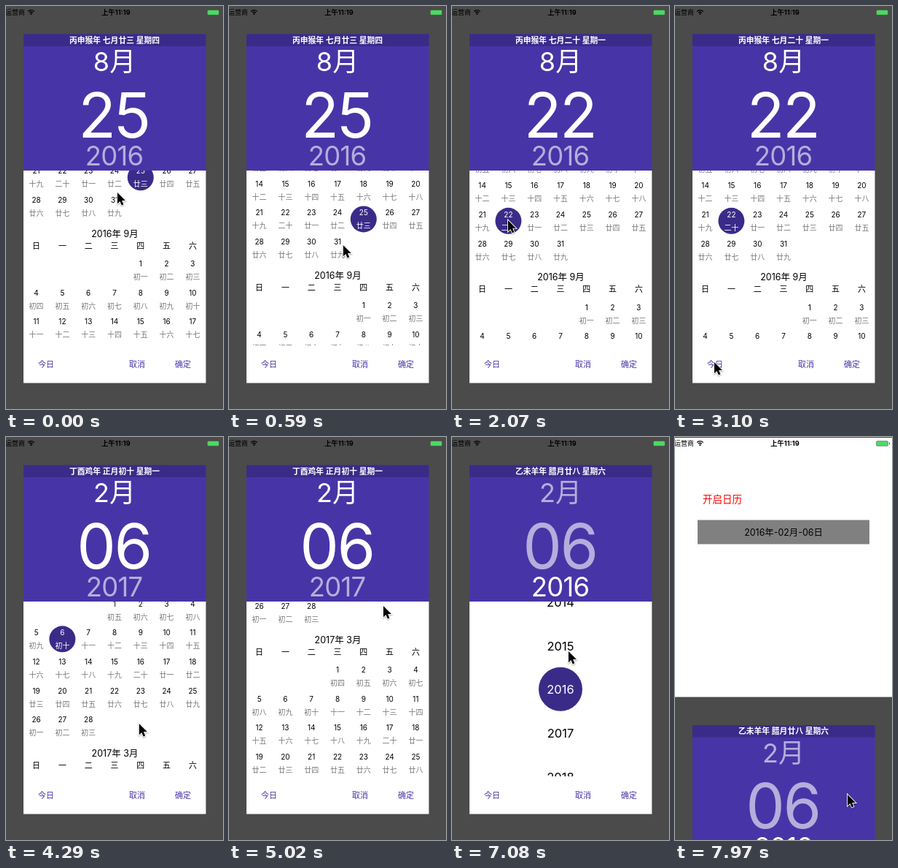
These frames come from a looping animation (298 px wide and 551 px high, 8000 ms). An HTML page with a canvas:

```html
<!DOCTYPE html>
<html lang="zh-CN">
<head>
<meta charset="utf-8">
<title>日历</title>
<style>
html, body { margin: 0; width: 100%; height: 100%; overflow: hidden; background: #fff; }
canvas { display: block; width: 298px; height: 551px; }
</style>
</head>
<body>
<canvas width="298" height="551"></canvas>
<script>
const ctx = document.querySelector('canvas').getContext('2d');
const FONT = 'Inter, "Noto Sans CJK SC", "Noto Sans CJK", sans-serif';
const LOOP = 8000, TICK = 147.6, LAST_TICK = 54;
const PURPLE = '#4735a7', DARK = '#3b2b89', SHADE = '#4b4b4b', DIM = '#b5aedc';
const MID = 149, COLUMN = 35.8, ROW = 39.7, MONTH_HEAD = 47.3, YEAR_ROW = ROW * 1.5;
const LEFT = 24, WIDTH = 250.5, TOP = 38.5, LIST_TOP = 225, LIST_BOTTOM = 464, BOTTOM = 515.5;
const TODAY_TICK = 23, YEARS_TICK = 39;
const DIGITS = '一二三四五六七八九十';
const WEEK = '日一二三四五六';

const STAGES = [
  { from: 0, year: 2016, month: 8, day: 25, lunar: '丙申猴年 七月廿三 星期四' },
  { from: 9, year: 2016, month: 8, day: 24, lunar: '丙申猴年 七月廿二 星期三' },
  { from: 14, year: 2016, month: 8, day: 22, lunar: '丙申猴年 七月二十 星期一' },
  { from: TODAY_TICK, year: 2017, month: 2, day: 6, lunar: '丁酉鸡年 正月初十 星期一' },
  { from: 46, year: 2016, month: 2, day: 6, lunar: '乙未羊年 腊月廿八 星期六' }
];

const columnX = c => 41.6 + c * COLUMN;
const dayNumber = (y, m, d) => Date.UTC(y, m - 1, d) / 864e5;
const progress = (k, from, to) => Math.min(1, Math.max(0, (k - from) / (to - from)));
const easeOut = (k, from, to) => 1 - (1 - progress(k, from, to)) ** 2;

// Lunar months alternate between 30 and 29 days from a new moon near each year shown.
function lunarDay(y, m, d) {
  const synodic = 29.5306;
  const newMoon = y === 2016 ? dayNumber(2016, 7, 4) : dayNumber(2016, 12, 29);
  const age = dayNumber(y, m, d) - newMoon;
  const n = age - Math.floor(0.5 + synodic * Math.floor((age + 0.5) / synodic)) + 1;
  if (n === 20) return '二十';
  if (n === 30) return '三十';
  return '初十廿'[Math.floor((n - (n === 10)) / 10)] + DIGITS[(n - 1) % 10];
}

function text(s, x, centerY, size, color, { weight = 400, align = 'center', spacing = 0 } = {}) {
  ctx.font = `${weight} ${size}px ${FONT}`;
  ctx.letterSpacing = spacing + 'px';
  ctx.textAlign = align;
  ctx.fillStyle = color;
  ctx.fillText(s, x, centerY + size * 0.37);
}

function rect(x, y, w, h, color) {
  ctx.fillStyle = color;
  ctx.fillRect(x, y, w, h);
}

function disc(x, y, r, color) {
  ctx.fillStyle = color;
  ctx.beginPath();
  ctx.arc(x, y, r, 0, 7);
  ctx.fill();
}

// Draws one month and returns the title position of the next.
function drawMonth(y, m, top, stage) {
  const first = new Date(Date.UTC(y, m - 1, 1)).getUTCDay();
  const days = dayNumber(y, m + 1, 1) - dayNumber(y, m, 1);
  text(`${y}年 ${m}月`, MID + 0.5, top + 0.3, 12.5, '#000');
  [...WEEK].forEach((w, c) => text(w, columnX(c), top + 17, 11, '#000'));
  for (let d = 1; d <= days; d++) {
    const slot = first + d - 1;
    const x = columnX(slot % 7), rowY = top + 41.5 + Math.floor(slot / 7) * ROW;
    const picked = y === stage.year && m === stage.month && d === stage.day;
    if (picked) disc(x, rowY + 8.7, 18, DARK);
    text(d, x, rowY, 10, picked ? '#fff' : '#000');
    text(lunarDay(y, m, d), x, rowY + 18, 10, picked ? '#fff' : '#777');
  }
  return top + MONTH_HEAD + Math.ceil((first + days) / 7) * ROW;
}

function drawCalendar(k, stage) {
  if (k < TODAY_TICK) {
    const august = 65 + ROW * 1.5 * easeOut(k, 0, 5);
    drawMonth(2016, 9, drawMonth(2016, 8, august, stage), stage);
  } else {
    const january = 9 - 224 * easeOut(k, 28, 34);
    const february = drawMonth(2017, 1, january, stage);
    drawMonth(2017, 3, drawMonth(2017, 2, february, stage), stage);
  }
}

function drawYears(k, stage) {
  const middle = 2017 - easeOut(k, 45, 48);
  for (let y = 2013; y <= 2020; y++) {
    const rowY = 344.8 + (y - middle) * YEAR_ROW, picked = y === stage.year;
    if (picked) disc(MID, rowY, 30, DARK);
    text(y, MID, rowY + 0.5, 16.5, picked ? '#fff' : '#000');
  }
}

function drawPage() {
  rect(0, 0, 298, 551, '#fff');
  text('开启日历', 38, 85, 13.5, '#f00', { align: 'left' });
  rect(31, 113.5, 236, 33, '#808080');
  text('2016年-02月-06日', MID, 130.5, 12.4, '#000');
}

function drawPanel(k, stage) {
  const yearMode = k >= YEARS_TICK;
  const dateColor = yearMode ? DIM : '#fff', yearColor = yearMode ? '#fff' : DIM;
  rect(0, 0, 298, 551, SHADE);
  rect(LEFT, LIST_TOP, WIDTH, BOTTOM - LIST_TOP, '#fff');

  ctx.save();
  ctx.beginPath();
  ctx.rect(LEFT, LIST_TOP, WIDTH, LIST_BOTTOM - LIST_TOP);
  ctx.clip();
  (yearMode ? drawYears : drawCalendar)(k, stage);
  ctx.restore();

  rect(LEFT, TOP, WIDTH, LIST_TOP - TOP, PURPLE);
  rect(LEFT, TOP, WIDTH, 16.5, DARK);
  text(stage.lunar, MID, 47, 10.8, '#fff', { weight: 600 });
  text(stage.month + '月', MID, 76, 36, dateColor);
  text(String(stage.day).padStart(2, '0'), MID - 1, 148.5, 85, dateColor, { spacing: -2.5 });
  text(stage.year, MID - 0.5, 204.5, 36.5, yearColor, { spacing: -0.8 });

  text('今日', 55, 490, 11, PURPLE);
  text('取消', 180, 490, 11, PURPLE);
  text('确定', 243, 490, 11, PURPLE);
}

function drawStatusBar() {
  rect(0, 0, 298, 1, SHADE);
  text('运营商', -1, 8.5, 9, '#000', { align: 'left' });
  text('上午11:19', 151, 8.5, 9.2, '#000', { weight: 700 });
  ctx.strokeStyle = '#000';
  ctx.lineWidth = 1.3;
  for (const r of [3.2, 5.8]) {
    ctx.beginPath();
    ctx.arc(34.5, 11.5, r, -Math.PI * 0.76, -Math.PI * 0.24);
    ctx.stroke();
  }
  disc(34.5, 10.9, 1.1, '#000');
  ctx.fillStyle = '#4cd964';
  ctx.strokeStyle = SHADE;
  ctx.lineWidth = 0.5;
  ctx.beginPath();
  ctx.roundRect(276.5, 5.5, 16, 6.8, 1.5);
  ctx.fill();
  ctx.stroke();
  rect(294, 7.6, 1, 2.6, SHADE);
}

function cursorAt(k) {
  let x = 153, y = 255;
  const move = (from, to, toX, toY) => {
    const u = easeOut(k, from, to);
    x += (toX - x) * u;
    y += (toY - y) * u;
  };
  move(0, 5, 157, 330);                // drag the list down
  move(6, 9, columnX(3) - 10, 291);    // pick a day
  move(10, 15, columnX(1) - 3, 293);   // pick another
  move(16, 18, 54, 545);
  move(19, 21, 54, 487);               // today
  move(25, 27, 170, 463);
  move(28, 34, 212, 231);              // drag the list up
  move(35, YEARS_TICK, MID, 204);      // open the years
  move(YEARS_TICK, 43, 158, 310);
  move(43, 45, 160, 293);              // pick a year
  move(48, 52, 237, 489);              // confirm
  return [x, y];
}

const ARROW = new Path2D('M0 0V15.2L3.5 12 5.8 17.4 8.4 16.3 6.1 11H11Z');

function drawCursor(k) {
  ctx.save();
  ctx.translate(...cursorAt(k));
  ctx.shadowColor = 'rgba(0,0,0,.35)';
  ctx.shadowBlur = 2;
  ctx.shadowOffsetY = 1;
  ctx.strokeStyle = '#fff';
  ctx.lineWidth = 1.8;
  ctx.stroke(ARROW);
  ctx.shadowColor = 'transparent';
  ctx.fillStyle = '#000';
  ctx.fill(ARROW);
  ctx.restore();
}

function draw(now) {
  // The picture advances in even ticks.
  const k = Math.min(LAST_TICK, Math.floor((now % LOOP + 8) / TICK));
  const stage = STAGES.filter(s => s.from <= k).pop();
  drawPage();
  ctx.save();
  ctx.translate(0, 355.5 * progress(k, 51, LAST_TICK) ** 2);
  drawPanel(k, stage);
  ctx.restore();
  drawStatusBar();
  drawCursor(k);
}

let start;
function loop(now) {
  start ??= now;
  draw(now - start);
  requestAnimationFrame(loop);
}
requestAnimationFrame(loop);
</script>
</body>
</html>
```
